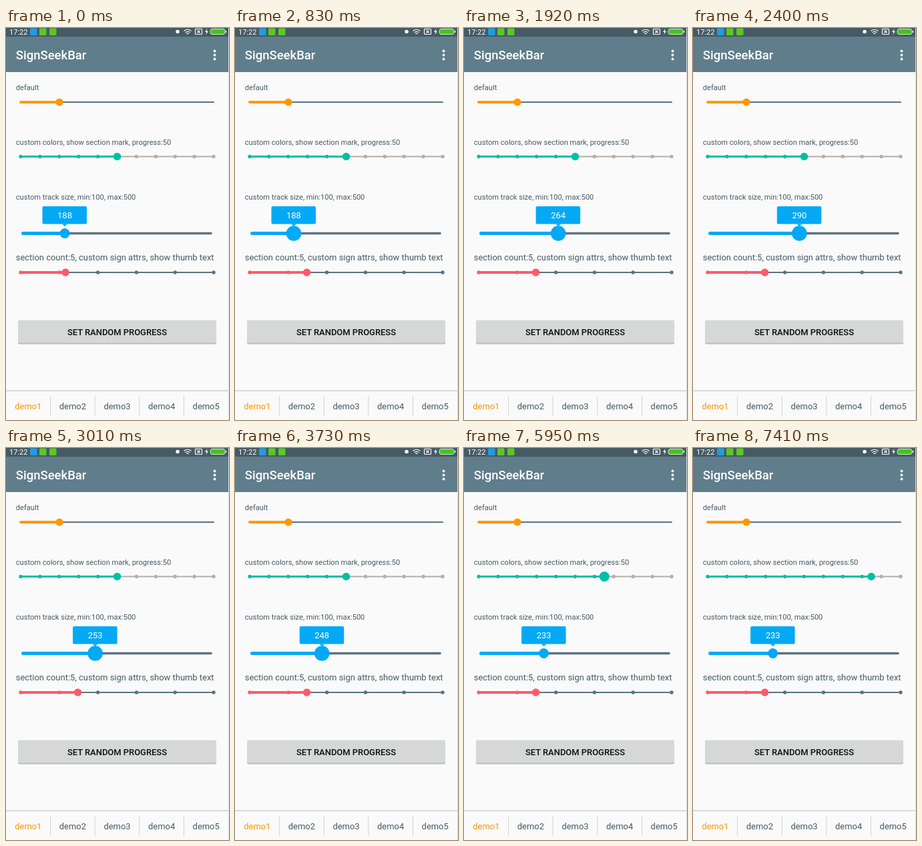
Recreate the animation shown at these times as an HTML page. Size 334 by 587 pixels, loop 8 s.

```html
<!DOCTYPE html>
<html lang="en">
<head>
<meta charset="utf-8">
<title>SignSeekBar</title>
<style>
html, body { margin: 0; width: 100%; height: 100%; overflow: hidden; background: #fafafa; }
svg { display: block; width: 334px; height: 587px; font: 12.95px Roboto, sans-serif; }
.label { font-size: 11.1px; }
.label, .tab { fill: #455a64; }
.mid { text-anchor: middle; }
.strong { font-weight: 500; }
line { stroke-linecap: round; }
</style>
</head>
<body>
<svg viewBox="0 0 334 587">
  <rect width="334" height="587" fill="#fafafa"/>

  <rect width="333" height="66" fill="#607d8b"/>
  <rect width="333" height="13" fill="#455a64"/>
  <g fill="#fff">
    <text x="5" y="9.5" font-size="11">17:22</text>
    <text class="strong" x="14.8" y="46.6" font-size="18.5">SignSeekBar</text>
    <circle cx="312.5" cy="34.5" r="1.9"/>
    <circle cx="312.5" cy="40.5" r="1.9"/>
    <circle cx="312.5" cy="46.5" r="1.9"/>
    <circle cx="257" cy="5.5" r="2.8"/>
    <path d="M301.5 1l-3.5 5h2.4l-1 4 3.6-5.2h-2.4z"/>
  </g>
  <rect x="36" y="0.5" width="10.5" height="10.5" rx="1.5" fill="#1e9de3"/>
  <rect x="50" y="0.5" width="10.5" height="10.5" rx="1.5" fill="#5cc822"/>
  <rect x="65" y="0.5" width="10.5" height="10.5" rx="1.5" fill="#5cc822"/>
  <g fill="none" stroke="#fff" stroke-width="1.2">
    <path d="M266.5 4.5q5.5-4.5 11 0M268.5 6.7q3.5-2.8 7 0M270.5 8.700q1.5-1 3 0"/>
    <rect x="283.5" y="1.5" width="10" height="8" rx="1"/>
    <path d="M286.5 3.500l4 4m0-4l-4 4"/>
    <rect x="306" y="1.5" width="22" height="8" rx="3" stroke="#d5ecc9" stroke-width="1" fill="#45c41c"/>
    <path d="M329.5 4v3"/>
  </g>

  <text class="label" x="14.8" y="93">default</text>
  <text class="label" x="14.8" y="174.5">custom colors, show section mark, progress:50</text>
  <text class="label" x="14.8" y="256.5">custom track size, min:100, max:500</text>
  <text class="tab" x="14.8" y="347.5">section count:5, custom sign attrs, show thumb text</text>

  <g id="bars"></g>

  <g id="sign" fill="#03a9f4">
    <rect x="-33.5" y="267" width="66.5" height="26.6" rx="2"/>
    <path d="M-4 293.5h8l-4 3.5z"/>
    <text id="value" class="mid" y="285" fill="#fff">188</text>
  </g>

  <rect x="18" y="439" width="297" height="34.5" rx="2" fill="#bcbcbc"/>
  <rect x="18" y="437.5" width="297" height="34" rx="2" fill="#d6d7d7"/>
  <text class="mid strong" x="166.5" y="460" fill="#0c0c0c">SET RANDOM PROGRESS</text>

  <rect y="542.5" width="334" height="1.5" fill="#cfcfcf"/>
  <g id="tabs"></g>
  <rect x="333" width="1" height="587" fill="#dedede"/>
</svg>
<script>
const LOOP = 8000, STEP = 121, TAB = 66.6;
const SLATE = '#5b7280';
const $ = id => document.getElementById(id);

function add(parent, tag, attrs, text) {
  const el = document.createElementNS('http://www.w3.org/2000/svg', tag);
  for (const key in attrs) el.setAttribute(key, attrs[key]);
  if (text) el.textContent = text;
  return parent.appendChild(el);
}

// Builds a seek bar and returns a function that places its thumb.
function seekBar({ y, from = 22, to = 311, color, rest = SLATE, thick = 4, thin = 2, sections = 0 }) {
  const g = add($('bars'), 'g', {});
  const track = (stroke, width) => add(g, 'line',
    { x1: from, x2: to, y1: y, y2: y, stroke, 'stroke-width': width });
  track(rest, thin);
  const done = track(color, thick);
  const marks = [];
  for (let i = 0; sections && i <= sections; i++) {
    const cx = from + (to - from) * i / sections;
    marks.push({ cx, el: add(g, 'circle', { cx, cy: y, r: 2.7 }) });
  }
  const thumb = add(g, 'circle', { cy: y, fill: color });
  return (x, r) => {
    done.setAttribute('x2', x);
    thumb.setAttribute('cx', x);
    thumb.setAttribute('r', r);
    for (const m of marks) m.el.setAttribute('fill', m.cx <= x ? color : rest);
  };
}

const orange = seekBar({ y: 111, color: '#ff9800' });
const green = seekBar({ y: 192.5, color: '#00bfa5', rest: '#b3b0ab', thick: 3, sections: 10 });
const blue = seekBar({ y: 307.5, from: 25.5, to: 307, color: '#03a9f4', thick: 5, thin: 3.5 });
const red = seekBar({ y: 366, color: '#ff5a6c', sections: 5 });
orange(80, 5.6);

for (let i = 0; i < 5; i++) {
  const tab = add($('tabs'), 'text', { x: TAB * (i + 0.5), y: 571, class: 'mid tab' }, 'demo' + (i + 1));
  if (i) add($('tabs'), 'rect', { x: TAB * i - 0.5, y: 551, width: 1, height: 30, fill: '#d3d3d3' });
  else tab.style.fill = '#fb9400';
}

// Turning points of each drag as [time, value]; sine easing joins them.
const drag = [[220, 88], [600, 91], [1070, 84.5], [1790, 150.5], [2160, 113.5],
  [2470, 166], [2760, 162], [3230, 108], [3490, 161.5], [3850, 119.6]];
const slide = [[5480, 166.5], [6270, 235.5], [6560, 246], [6800, 246], [7040, 267]];
const settle = [[220, 89], [640, 107.5]];

const press = (down, up, small, big) => [[down, small], [down + 100, big], [up - 100, big], [up, small]];
const bluePress = press(480, 4450, 7.4, 11.3);
const greenPress = press(5470, 7390, 5.8, 7.5);

function at(keys, t) {
  const next = keys.findIndex(key => key[0] > t);
  if (next === 0) return keys[0][1];
  if (next < 0) return keys[keys.length - 1][1];
  const [[t0, a], [t1, b]] = [keys[next - 1], keys[next]];
  return a + (b - a) * (1 - Math.cos(Math.PI * (t - t0) / (t1 - t0))) / 2;
}

// The screen refreshes in steps counted from the start of a gesture.
const hold = (t, start) => start + Math.floor((t - start) / STEP) * STEP;

function draw(now) {
  const t = Math.max(0, now) % LOOP;
  const first = hold(t, 220), second = hold(t, 5580);
  const x = at(drag, first);
  blue(x, at(bluePress, first));
  $('sign').setAttribute('transform', `translate(${x} 0)`);
  $('value').textContent = Math.round(188 + (x - 88) / 0.702);
  red(at(settle, first), 5.8);
  green(at(slide, second), at(greenPress, second));
  requestAnimationFrame(draw);
}
draw(0);
</script>
</body>
</html>
```
